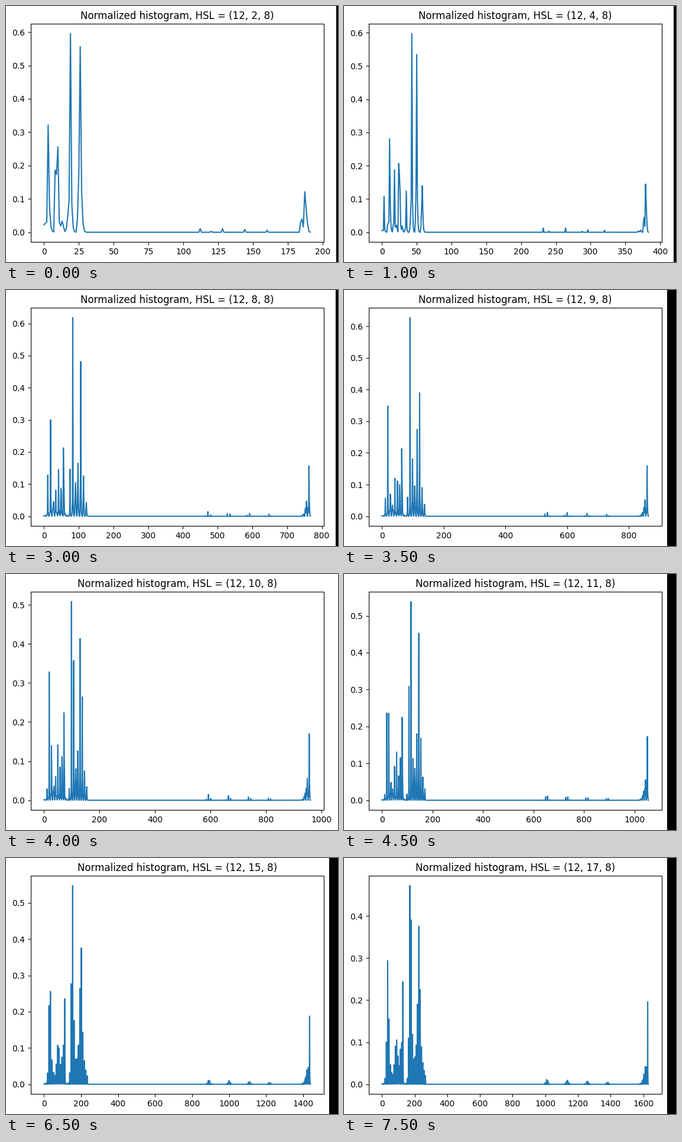
A matplotlib script for the animation above (8 s loop, 562 by 433 pixels).

```python
import matplotlib.pyplot as plt
import numpy as np
from matplotlib.animation import FuncAnimation
from matplotlib.patches import Rectangle

W, H, DPI = 562, 433, 100
LEFT, BOTTOM, AX_W, AX_H = 41.72, 33.52, 496, 369.6
HUES, LIGHTS = 12, 8
FIRST, STEPS = 2, 16

blobs = []


def blob(hue, weight, sat, sat_spread, light, light_spread):
    """A soft cluster of pixels; saturation 0..1, lightness 0..8."""
    blobs.append((hue, weight, sat, sat_spread, light, light_spread))


# Reds
blob(0, 0.32, 0.27, 0.025, 3.5, 0.08)
blob(0, 0.16, 0.36, 0.05, 4.2, 0.35)
blob(0, 0.20, 0.66, 0.045, 2.5, 0.12)
blob(0, 0.46, 0.90, 0.05, 1.6, 0.5)
blob(0, 0.14, 0.99, 0.004, 0.5, 0.05)
blob(0, 0.25, 0.45, 0.1, 1.5, 1.2)
blob(0, 0.08, 0.75, 0.1, 5.7, 0.4)

# Oranges
blob(1, 0.60, 0.286, 0.025, 3.5, 0.12)
blob(1, 0.25, 0.38, 0.05, 3.9, 0.45)
blob(1, 0.335, 0.683, 0.026, 2.5, 0.1)
blob(1, 1.00, 0.66, 0.11, 2.33, 0.52)

# Dark blues to purples: fainter and greyer with each hue
for k in range(4):
    blob(7 + k, 0.016 - 0.003 * k, 0.46 - 0.09 * k, 0.03, 0.5, 0.05)

# Magentas
blob(11, 0.12, 0.88, 0.05, 1.2, 0.5)
blob(11, 0.17, 0.88, 0.05, 4.5, 0.4)
blob(11, 0.122, 0.99, 0.004, 3.5, 0.08)


def share(edges, center, spread):
    """Part of a logistic distribution that falls in each bin."""
    return np.diff(0.5 + 0.5 * np.tanh((edges - center) / (2 * spread)))


def histogram(sats):
    bins = np.zeros((HUES, sats, LIGHTS))
    sat_edges = np.linspace(0, 1, sats + 1)
    light_edges = np.arange(LIGHTS + 1)
    for hue, weight, sat, sat_spread, light, light_spread in blobs:
        bins[hue] += weight * np.outer(share(sat_edges, sat, sat_spread),
                                       share(light_edges, light, light_spread))
    return bins.ravel() / np.linalg.norm(bins)


def page_width():
    """Page edge: the axes, or the last tick label if it sticks out."""
    lo, hi = ax.get_xlim()
    tick = max(t for t in ax.get_xticks() if t <= hi)
    x = LEFT + AX_W * (tick - lo) / (hi - lo)
    return min(W, max(547, int(x + 4.49 * len(f"{tick:.0f}") + 10)))


fig = plt.figure(figsize=(W / DPI, H / DPI), dpi=DPI, facecolor="white")
ax = fig.add_axes([LEFT / W, BOTTOM / H, AX_W / W, AX_H / H])
strip = fig.add_artist(Rectangle((1, 0), 1, 1, color="black", lw=0,
                                 antialiased=False,
                                 transform=fig.transFigure))


def draw(i):
    sats = FIRST + i
    ax.clear()
    ax.plot(histogram(sats))
    ax.set_title(f"Normalized histogram, HSL = ({HUES}, {sats}, {LIGHTS})")
    strip.set_x(page_width() / W)
    return ax, strip


anim = FuncAnimation(fig, draw, frames=STEPS, interval=500, init_func=lambda: (),
                     repeat=True, repeat_delay=0, blit=False)
plt.show()
```
